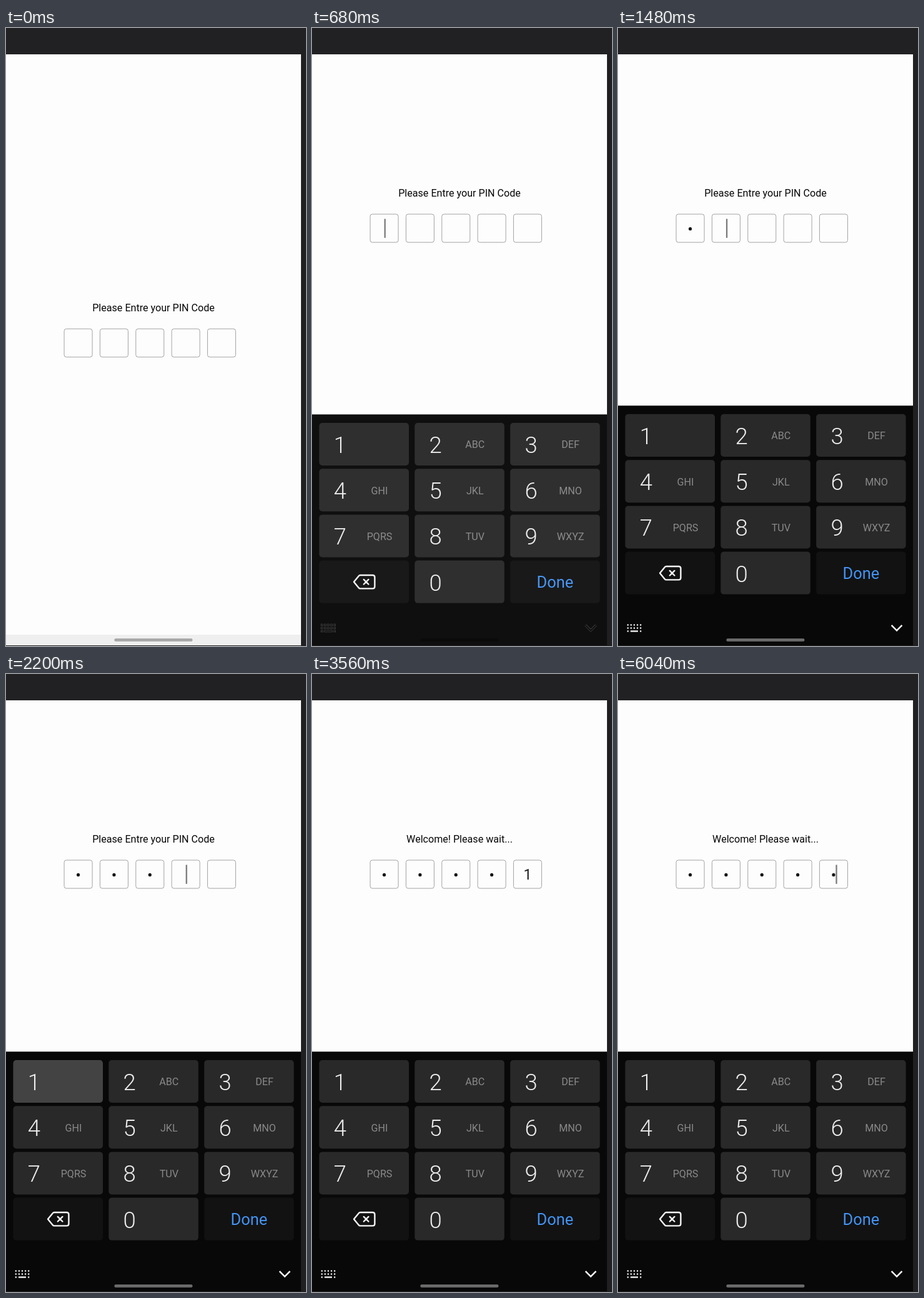
Recreate the animation shown at these times as an HTML page with a canvas. Size 480 by 986 pixels, loop 6200 ms.

```html
<!DOCTYPE html>
<html lang="en">
<head>
<meta charset="utf-8">
<title>PIN entry</title>
<style>
  html, body { margin: 0; width: 100%; height: 100%; overflow: hidden; background: #202022; }
  canvas { display: block; width: 480px; height: 986px; }
</style>
</head>
<body>
<canvas id="stage" width="480" height="986"></canvas>
<script>
const LOOP = 6200, W = 480, H = 986, PAGE_W = 472, FLOOR = 985;
const FONT = 'Roboto, "Noto Sans", sans-serif';
const ctx = document.getElementById('stage').getContext('2d');

// Timeline in ms
const FOCUS = 360, LAYOUT = 520, UNMASK_END = 4560, PIN_DONE = 3040;
const PRESSES = [1360, 1720, 2120, 2480, 2960];
const HOLD = 80, RELEASE = 120;

// Layout
const KB_TOP = 602.5, LIFT = 183;
const KEY = { x: 11.5, y: 616, w: 143.5, h: 68, dx: 152.8, dy: 73.2 };
const LABELS = ['', 'ABC', 'DEF', 'GHI', 'JKL', 'MNO', 'PQRS', 'TUV', 'WXYZ'];
const CELL = { x: 93.05, w: 45, dx: 57.35, y: 480 };

const clamp = v => Math.min(1, Math.max(0, v));
const span = (t, a, b) => clamp((t - a) / (b - a));
const easeOut = p => 1 - (1 - p) ** 2;

function box(c, x, y, w, h, r, color) {
  c.beginPath();
  c.roundRect(x, y, w, h, r);
  c.fillStyle = color;
  c.fill();
}

function text(c, str, x, y, size, color, weight = 400) {
  c.font = `${weight} ${size}px ${FONT}`;
  c.textAlign = 'center';
  c.textBaseline = 'alphabetic';
  c.fillStyle = color;
  c.fillText(str, x, y);
}

function line(c, points, closed) {
  points.forEach(([x, y], i) => i ? c.lineTo(x, y) : c.moveTo(x, y));
  if (closed) c.closePath();
}

function backspace(c) {
  c.strokeStyle = '#f6f6f6';
  c.lineWidth = 2.4;
  c.lineCap = c.lineJoin = 'round';
  c.beginPath();
  c.moveTo(67, 869.7);
  c.lineTo(74.6, 860.4);
  c.quadraticCurveTo(75.6, 859, 77.4, 859);
  c.lineTo(97, 859);
  c.quadraticCurveTo(100.4, 859, 100.4, 862.4);
  c.lineTo(100.4, 877);
  c.quadraticCurveTo(100.4, 880.4, 97, 880.4);
  c.lineTo(77.4, 880.4);
  c.quadraticCurveTo(75.6, 880.4, 74.6, 879);
  c.closePath();
  line(c, [[82.8, 865.9], [90.4, 873.5]]);
  line(c, [[90.4, 865.9], [82.8, 873.5]]);
  c.stroke();
}

function paintKeyboard(c, pressed) {
  c.clearRect(0, 0, W, H);
  c.fillStyle = '#080808';
  c.fillRect(0, KB_TOP, PAGE_W, H - KB_TOP + 150);
  for (let i = 0; i < 12; i++) {
    const x = KEY.x + (i % 3) * KEY.dx;
    const y = KEY.y + Math.floor(i / 3) * KEY.dy;
    const special = i === 9 || i === 11;
    const shade = Math.round(41 + (i ? 0 : 52 * pressed));
    box(c, x, y, KEY.w, KEY.h, 5, special ? '#121212' : `rgb(${shade},${shade},${shade})`);
    if (special) continue;
    text(c, i === 10 ? '0' : i + 1, x + 33.4, y + 48, 36.5, '#ededed', 300);
    if (LABELS[i]) text(c, LABELS[i], x + 96.5, y + 40.3, 16.1, '#898989');
  }
  backspace(c);
  text(c, 'Done', 388.9, 879.4, 25.4, '#4294f5');
}

const layer = document.createElement('canvas');
layer.width = W;
layer.height = H;
const kb = layer.getContext('2d');

function keyboard(t) {
  const alpha = span(t, 558, 685);
  if (!alpha) return;
  const offset = 143.2 * (1 - span(t, 560, 736)) ** 2;
  let pressed = 0;
  for (const p of PRESSES) {
    if (t >= p && t < p + RELEASE) pressed = t < p + HOLD ? 1 : 0.5;
  }
  paintKeyboard(kb, pressed);
  ctx.globalAlpha = alpha;
  ctx.drawImage(layer, 0, offset);
  ctx.globalAlpha = 1;
}

function navIcons(grow, color) {
  ctx.fillStyle = ctx.strokeStyle = color;
  ctx.lineCap = ctx.lineJoin = 'miter';
  const dot = (x, y, w = 2.2) =>
    ctx.fillRect(x - w / 2 - grow, y - 1.1 - grow, w + 2 * grow, 2.2 + 2 * grow);
  for (let i = 0; i < 5; i++) {
    const x = 15.8 + i * 5.1;
    dot(x, 952.4);
    dot(x, 957.4);
    if (i % 4 === 0) dot(x, 962.4);
  }
  dot(26, 962.4, 12);
  ctx.lineCap = 'butt';
  ctx.lineWidth = 2.4 + 2 * grow;
  ctx.beginPath();
  line(ctx, [[437.6, 952.8], [446, 961.3], [454.4, 952.8]]);
  ctx.stroke();
}

function navBar(t) {
  const shown = span(t, 558, 600);
  if (shown) {
    const p = easeOut(span(t, 700, 1160));
    const g = Math.round(255 * p);
    const halo = 0.28 * (1 - p) * span(t, 600, 680);
    if (halo) navIcons(0.6, `rgba(255,255,255,${halo})`);
    navIcons(0, `rgba(${g},${g},${g},${shown * (0.8 + 0.2 * p)})`);
  }
  const q = easeOut(span(t, 700, 960));
  const g = Math.round(255 * q);
  box(ctx, 173.3, 974.1, 125.2, 4.6, 2.3, `rgba(${g},${g},${g},${0.3 + 0.1 * q})`);
}

function pinForm(t) {
  const lift = t >= LAYOUT ? LIFT : 0;
  const top = CELL.y - lift;
  const done = t >= PIN_DONE;
  text(ctx, done ? 'Welcome! Please wait...' : 'Please Entre your PIN Code',
    236, 452.4 - lift, 16.1, '#060606');

  const filled = PRESSES.filter(p => t >= p + HOLD).length;
  const middle = i => CELL.x + CELL.w / 2 + i * CELL.dx;
  const digit = done && t < UNMASK_END;
  for (let i = 0; i < 5; i++) {
    ctx.beginPath();
    ctx.roundRect(CELL.x + i * CELL.dx, top, CELL.w, CELL.w, 3.5);
    ctx.lineWidth = 1;
    ctx.strokeStyle = '#a3a3a3';
    ctx.stroke();
    if (i >= filled) continue;
    if (i === 4 && digit) {
      text(ctx, '1', middle(i), top + 31, 23, '#1a1a1a');
    } else {
      ctx.beginPath();
      ctx.arc(middle(i), top + 23.4, 2.6, 0, Math.PI * 2);
      ctx.fillStyle = '#161616';
      ctx.fill();
    }
  }

  // The caret blinks every half second, counted from the last edit
  if (t < FOCUS) return;
  const since = filled ? PRESSES[filled - 1] + HOLD - (done ? 10 : 0) : FOCUS;
  if (Math.floor((t - since) / 500) % 2) return;
  const shift = !done ? 0 : digit ? 6.3 : 3.4;
  ctx.fillStyle = '#7b7b7b';
  ctx.fillRect(middle(Math.min(filled, 4)) + shift, top + 7.5, 2.3, 30.3);
}

function draw(t) {
  ctx.fillStyle = '#fdfdfd';
  ctx.fillRect(0, 0, W, H);
  ctx.fillStyle = '#efefef';
  ctx.fillRect(0, 968, PAGE_W, 17);
  pinForm(t);
  keyboard(t);
  navBar(t);
  ctx.fillStyle = '#212123';
  ctx.fillRect(0, 0, W, 42);
  ctx.fillStyle = '#202022';
  ctx.fillRect(PAGE_W, 42, W - PAGE_W, H);
  ctx.fillRect(0, FLOOR, W, 1);
}

const start = performance.now();
function tick() {
  draw((performance.now() - start) % LOOP);
  requestAnimationFrame(tick);
}
tick();
</script>
</body>
</html>
```
